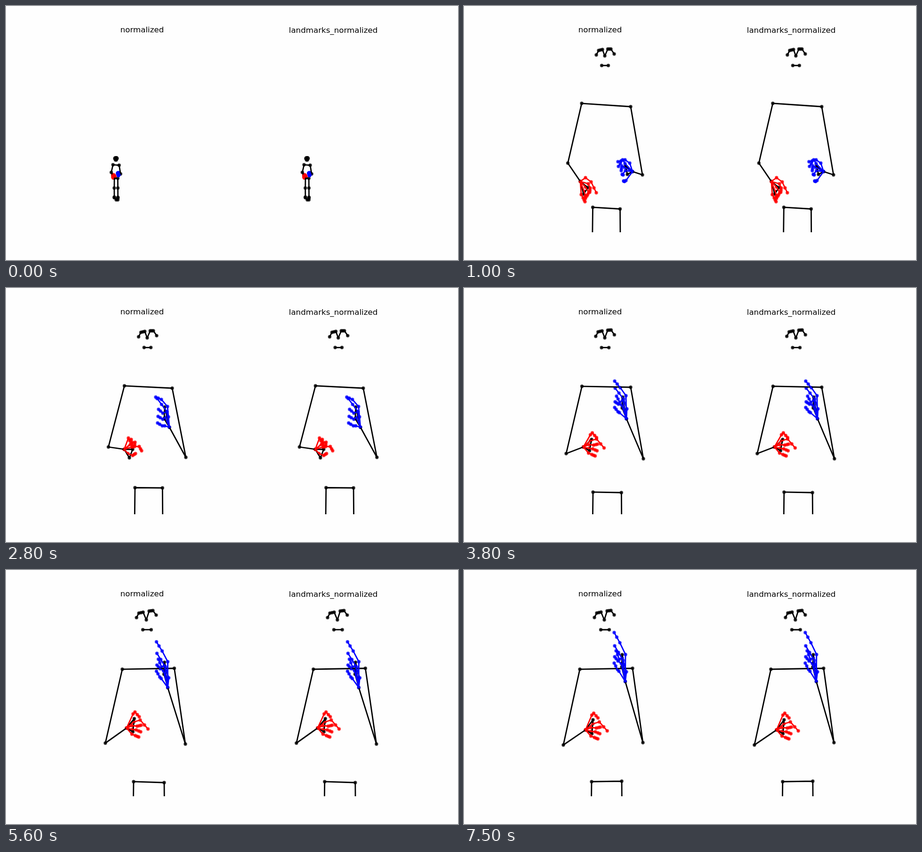
Animation, 960 px wide and 540 px high, one loop 8 s. Source, as an HTML page:

```html
<!DOCTYPE html>
<html lang="en">
<head>
<meta charset="utf-8">
<title>Pose normalization</title>
<style>
  html, body { margin: 0; width: 100%; height: 100%; overflow: hidden; background: #fefefe; }
  svg { display: block; width: 960px; height: 540px; }
  text { font: 16.67px "DejaVu Sans", sans-serif; text-anchor: middle; }
  path { fill: none; stroke-width: 2.78; stroke-linecap: square; }
  circle { fill-opacity: .8; }
</style>
</head>
<body>
<svg viewBox="0 0 960 540">
  <clipPath id="axes"><rect width="960" height="481"/></clipPath>
  <text x="289" y="56">normalized</text>
  <text x="695" y="57">landmarks_normalized</text>
  <g clip-path="url(#axes)">
    <g id="figure"></g>
    <use href="#figure" x="405.8"/>
  </g>
</svg>
<script>
const figure = document.getElementById('figure');

// Shoulders, elbows, wrists and hips, right before left.
const bodies = [
  [250,207, 354,214, 220.5,334, 379,359, 247,373, 358,352, 273.5,428, 331.5,431.5],
  [251.5,208, 353,213, 217.5,338, 382,360, 251,343, 347,296, 274,424.5, 332.3,425],
  [250.5,209, 354,211, 217,352, 381,363, 253.5,338, 345,278, 274,434, 334.3,435],
  [249,210, 356,210, 214.5,366, 383,372, 254.5,339, 345,261, 273,445, 337,445],
  [247,211, 357.5,209, 211,368, 381,370, 256,336, 343.5,250, 271,450, 336,452],
  [246,211, 358,209, 211,372, 380,367, 258,340, 342.5,237, 271,450, 335,449]
];

// Relative to the wrist: palm corners, then base, middle and tip of each finger, thumb first.
const rightHand = [
  [7,27, 16,13,  11,-8, 23,1, 34,24,  17,5, 21,14, 20,23,  11,12, 18,23, 14,31,  8,21, 11,30, 11,36,  2,28, 6,35, 10,43],
  [11,18, 18,0,  9,-24, 12,-18, 15,-21,  19,-6, 32,-6, 37,3,  15,-13, 23,-15, 22,-6,  13,-10, 17,-15, 17,-4,  8,9, 18,13, 24,9],
  [13,8, 17.5,-16,  15,-26, 19,-30, 28,-20,  15,-13, 28,-17, 44,2,  12,-5, 22,-4, 30,-6,  12,3, 20,4, 29,8,  11,13, 18,16, 25,19]
];
const leftHand = [
  [-11,6, -15,-12,  -6,-18, -16,-25, -31,-21,  -16,-17, -21,-25, -30,-11,  -17,-9, -23,-12, -24,-2,  -15,-2, -22,6, -20,7,  -14,19, -17,21, -19,20],
  [-11,-18, -10,-43,  -2,-22, -5,-33, -26,-61,  -4,-44, -17,-59, -29,-64,  -6,-33, -14,-30, -23,-38,  -9,-21, -14,-17, -24,-23,  -10,-3, -15,-3, -25,-9],
  [-9,-23, -8,-46,  1,-21, -6,-42, -24,-65,  -1,-49, -13,-66, -25,-80,  -8,-40, -14,-35, -21,-48,  -10,-29, -17,-31, -24,-36,  -15,-13, -18,-15, -25,-24]
];
// Ear, eye corners, nose, eye corners, ear, mouth corners.
const faces = [
  [281,104, 286,94.5, 294,92.5, 299,106, 305.5,91.5, 312,91.5, 319,102, 292.5,126.5, 306.5,126.5],
  [277,101, 282,91.5, 291,89.5, 298,106, 304,87, 312,86, 319,95.5, 290.5,127, 308.5,127]
];

const stretchPhase = [0, 0, 0, .42, .72, 1];
const facePhase = [0, .1, .4, .75, .95, 1];
const faceShift = [0, 1, .4, .8, 0, 0];

// Start time of each pose and its place between the key bodies.
const steps = [[0, -.15], [100, -.15], [1000, 0], [1900, .5], [2800, 1],
               [3800, 2], [4700, 3], [5600, 4], [6600, 4.5], [7500, 5]];

const lerp = (a, b, t) => a + (b - a) * t;
const between = (p, q, t) => [lerp(p[0], q[0], t), lerp(p[1], q[1], t)];

function sample(keys, u) {
  const i = Math.max(0, Math.min(keys.length - 2, Math.floor(u)));
  const [a, b] = [keys[i], keys[i + 1]];
  return Array.isArray(a) ? a.map((v, j) => lerp(v, b[j], u - i)) : lerp(a, b, u - i);
}

const points = list => Array.from({ length: list.length >> 1 }, (_, i) => [list[2 * i], list[2 * i + 1]]);
const chain = list => list.slice(1).map((p, i) => [list[i], p]);

// Late in the motion the left hand shears upward and the right thumb lifts.
const stretchLeft = (x, y, w, thumb) => [x + 1.5 * w, y + w * (.45 * x + (thumb ? 0 : .16 * y))];
const stretchRight = (x, y, w, thumb) => thumb ? [x - 1.5 * w, y - 5.5 * w] : [x * (1 + .05 * w), y];

function hand(shapes, stretch, u, wrist, color) {
  const w = sample(stretchPhase, u);
  const [pinky, index, ...joints] = points(sample(shapes, Math.min(u, 2))).map(([x, y], i) => {
    const [dx, dy] = stretch(x, y, w, i > 1 && i < 5 || i === 1 && stretch === stretchRight);
    return [wrist[0] + dx, wrist[1] + dy];
  });
  const fingers = [0, 3, 6, 9, 12].map(i => {
    const [base, middle, tip] = joints.slice(i, i + 3);
    return [base, middle, between(middle, tip, .55), tip];
  });
  return {
    color, pinky, index,
    dots: [wrist, ...fingers.flat()],
    lines: fingers.flatMap(finger => chain([wrist, ...finger]))
  };
}

function faceParts(u) {
  const v = Math.max(0, u), shift = sample(faceShift, v);
  const [earR, outR, inR, nose, inL, outL, earL, ...mouth] =
    points(sample(faces, sample(facePhase, v))).map(([x, y]) => [x + shift, y]);
  const brow = [earR, outR, between(outR, inR, .5), inR, nose, inL, between(inL, outL, .5), outL, earL];
  return { dots: [...brow, ...mouth], lines: [...chain(brow), ...chain(mouth)] };
}

function leg([x, y], lean, heelY, toe) {
  const knee = x + lean * (594 - y) / 50;
  return [[x, y], [knee, 594], [knee + 1, heelY - 10], [knee + 1, heelY], toe];
}

function pose(u) {
  const joints = points(sample(bodies, u));
  const [shR, shL, elR, elL, wrR, wrL, hipR, hipL] = joints;
  if (u > 0 && u < 1) elL[0] += 3.5 * Math.sin(Math.PI * u);
  const left = hand(leftHand, stretchLeft, u, wrL, '#00f');
  const right = hand(rightHand, stretchRight, u, wrR, '#f00');
  const face = faceParts(u);
  const legR = leg(hipR, -.6, 755, [304, 790]), legL = leg(hipL, .4, 760, [332, 790]);
  const palm = (wrist, h) => chain([wrist, h.pinky, h.index, wrist]);
  const body = {
    color: '#000',
    dots: [...face.dots, ...joints.slice(0, 6), right.pinky, right.index, left.pinky, left.index, ...legR, ...legL],
    lines: [
      ...face.lines, ...chain([wrR, elR, shR, shL, elL, wrL]),
      ...palm(wrR, right), ...palm(wrL, left),
      [hipR, hipL], ...chain(legR), ...chain(legL)
    ]
  };
  return [body, left, right];
}

function render(u, small) {
  const parts = pose(u);
  const place = ([x, y]) => (small ? [x * .125 + 196, y * .1275 + 311.2] : [x, y]).map(v => v.toFixed(2));
  const dots = parts.map(p => p.dots.map(place).map(([x, y]) =>
    `<circle cx="${x}" cy="${y}" r="3.7" fill="${p.color}"/>`).join(''));
  const lines = parts.map(p =>
    `<path stroke="${p.color}" d="${p.lines.map(([a, b]) => `M${place(a)}L${place(b)}`).join('')}"/>`);
  figure.innerHTML = dots.join('') + lines.join('');
}

let shown = -1;
function tick() {
  const time = performance.now() % 8000;
  const step = steps.filter(([start]) => start <= time).length - 1;
  if (step !== shown) {
    shown = step;
    render(steps[step][1], step === 0);
  }
  requestAnimationFrame(tick);
}
tick();
</script>
</body>
</html>
```
